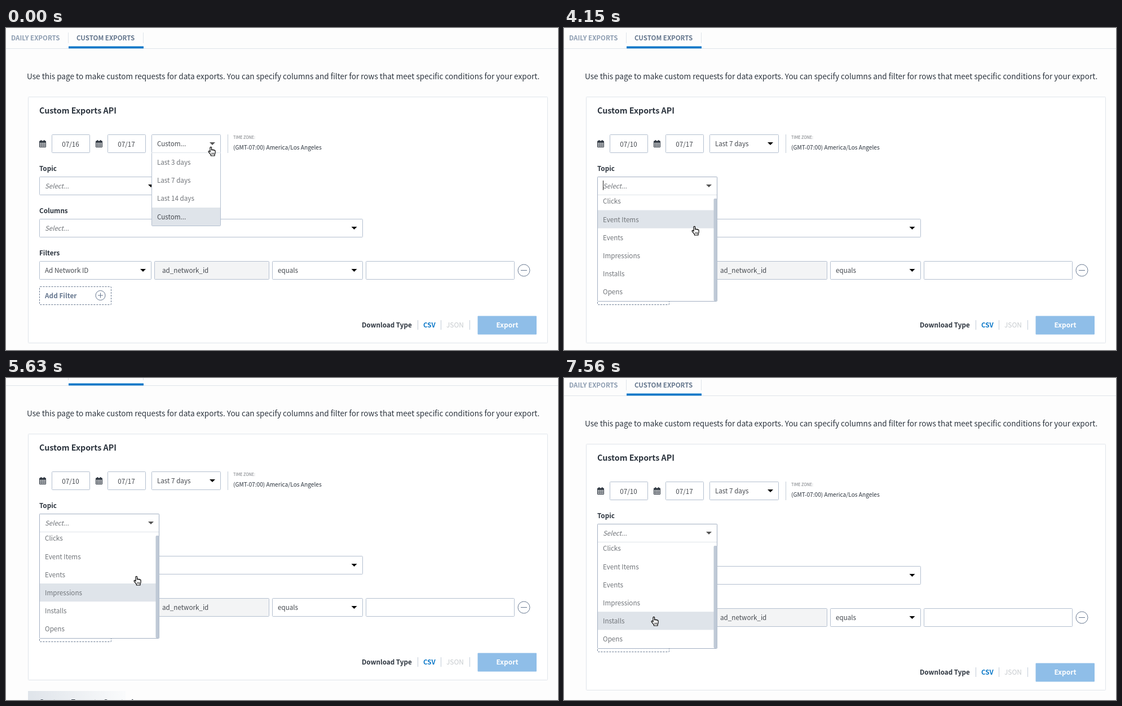
Write an HTML page that moves like this. It is 979 px wide and 572 px high and loops after 8 s.

```html
<!DOCTYPE html>
<html lang="en">
<head>
<meta charset="utf-8">
<title>Custom exports</title>
<style>
  html, body { margin: 0; width: 100%; height: 100%; overflow: hidden; background: #fdfdfd; }
  svg { display: block; width: 100vw; height: 100vh; }
  text { font-family: "Noto Sans CJK JP", "Noto Sans CJK SC", "Noto Sans CJK KR", "Noto Sans", sans-serif; white-space: pre; }
</style>
</head>
<body>
<svg id="stage" viewBox="0 0 979 572"></svg>
<script>
const LOOP = 8000, TICK = 148.1;
const INK = '#2c343e', BODY = '#45494f', SOFT = '#707479', SLATE = '#66778f';
const EDGE = '#b3bfcf', RULE = '#dfe4ea', FILL = '#dfe4ea', BLUE = '#0b78c8';
const ROW = 32.2, FIELD = 11.65;

// Markup helpers
const text = (x, y, str, size, weight = 400, fill = INK, more = '') =>
  `<text x="${x}" y="${y}" font-size="${size}" font-weight="${weight}" fill="${fill}" ${more}>${str}</text>`;
const rect = (x, y, w, h, fill, more = '') =>
  `<rect x="${x}" y="${y}" width="${w}" height="${h}" fill="${fill}" ${more}/>`;
const box = (x, y, w, h = 33, fill = '#fff', stroke = EDGE, more = '') =>
  rect(x + .5, y + .5, w - 1, h - 1, fill, `stroke="${stroke}" rx="1" ${more}`);
const vline = (x, y, h, color = '#c3ccd8') => rect(x, y, 1, h, color);
const arrow = (x, y, fill = '#000', w = 5, more = '') =>
  `<path d="M${x - w} ${y}h${2 * w}l${-w} ${w}z" fill="${fill}" ${more}/>`;
const label = (y, str) => text(59, y, str, 11.7, 600);
const field = (x, y, str, more = '') => text(x, y, str, FIELD, 300, BODY, more);
const hint = (y, more = '') => text(69, y, 'Select...', 11.5, 300, SOFT, `font-style="italic" ${more}`);
const group = (id, body) => `<g id="${id}">${body}</g>`;
const ring = (x, y, r, arm, plus) =>
  `<g fill="none" stroke="${SLATE}"><circle cx="${x}" cy="${y}" r="${r}"/>` +
  `<path d="M${x - arm} ${y}h${2 * arm}${plus ? `M${x} ${y - arm}v${2 * arm}` : ''}"/></g>`;

function calendar(x, y) {
  let cells = '';
  for (let i = 0; i < 12; i++)
    cells += rect(x + 1.2 + (i % 4) * 2.65, y + 4.8 + Math.floor(i / 4) * 2.6, 1.8, 1.8, '#fff');
  return rect(x, y + 1.6, 12, 11.4, INK, 'rx="1"') + cells +
    rect(x + 2.3, y, 2, 3.4, INK, 'rx=".8"') + rect(x + 7.7, y, 2, 3.4, INK, 'rx=".8"');
}

const tabs =
  rect(0, 36, 979, 1, RULE) +
  text(9, 21.5, 'DAILY EXPORTS', 11.5, 600, '#8d9db1') +
  text(125, 21.5, 'CUSTOM EXPORTS', 11.5, 600, '#63758c') +
  vline(110, 8, 19, RULE) + vline(243, 8, 19, RULE) +
  rect(111, 32.5, 133, 3.8, BLUE);

const form =
  text(37, 91, 'Use this page to make custom requests for data exports. You can specify columns and filter for rows that meet specific conditions for your export.', 13.59) +
  box(39, 122, 922, 438, '#fff', RULE) +
  text(59, 152, 'Custom Exports API', 14.3, 700) +
  calendar(59, 199) + calendar(159, 199) +
  box(81, 189, 68) + box(180, 189, 68) +
  field(114.5, 210.5, '', 'id="from" text-anchor="middle"') +
  field(213.5, 210.5, '07/17', 'text-anchor="middle"') +
  vline(393, 189, 33) +
  text(403, 197, 'TIME ZONE:', 7.2, 400, SOFT) +
  text(403, 216, '(GMT-07:00) America/Los Angeles', 10.17) +
  label(254, 'Topic') + box(59, 264, 213) + hint(284.5) +
  arrow(257, 278, '#000', 5, 'id="topicArrow"') +
  label(329, 'Columns') + box(59, 339, 574) + hint(359.5) + arrow(617.5, 353) +
  label(404, 'Filters') +
  box(59, 414, 199) + field(69, 434.5, 'Ad Network ID') + arrow(243, 428) +
  box(263, 414, 204, 33, '#f3f4f5') + field(277, 434.5, 'ad_network_id') +
  box(472, 414, 161) + field(482, 434.5, 'equals') + arrow(617.5, 428) +
  box(638, 414, 264) + ring(918.5, 430.5, 10.5, 5.5) +
  box(59, 459, 128, 33, '#fff', SLATE, 'stroke-dasharray="3 2"') +
  text(69, 480, 'Add Filter', 11.8, 600, SLATE) + ring(167.5, 475, 8.5, 4.5, true) +
  text(631, 532, 'Download Type', 11.65, 600) + vline(730, 519, 17) +
  text(740, 532, 'CSV', 11.65, 700, BLUE) + vline(771, 519, 17) +
  text(781, 532, 'JSON', 11.9, 400, '#c6cace') + vline(822, 519, 17) +
  rect(836.5, 511.5, 104.5, 33, '#8fbee8', 'rx="1"') +
  text(889, 532, 'Export', 12, 600, '#fff', 'text-anchor="middle"');

const heads = [
  [65, 'DATE CREATED', 149.5], [228, 'TOPIC / DATE RANGE', 344.5],
  [591, 'ROW COUNT', 663.5], [700, 'FORMAT', 751.5], [790, 'STATUS', 837.5]
];
const table =
  rect(39, 579, 173, 39, 'url(#fade)') +
  text(58, 605, 'Custom Exports Created', 14.3, 700) +
  box(39, 618, 922, 200, '#fff', RULE) +
  box(47, 608, 907, 60, '#f0f2f6', RULE) +
  [211, 573, 683, 773].map(x => vline(x, 609, 40, '#fff')).join('') +
  heads.map(([x, str, ax], i) => {
    const color = i ? '#5a6b82' : BLUE;
    return text(x, 634.5, str, 10, 700, color, 'letter-spacing=".35"') + arrow(ax, 629, color, 3.5);
  }).join('');

// Range picker
const ranges = ['Last 3 days', 'Last 7 days', 'Last 14 days', 'Custom...'];
const range =
  rect(256.5, 187.5, 126, 36, 'none', 'id="glow" rx="3" stroke="#cfe5f7" stroke-width="3"') +
  box(258, 189, 123, 33, '#fff', EDGE, 'id="rangeBox"') +
  field(268, 210, '', 'id="rangeText"') + arrow(366, 203, '#000', 5, 'id="rangeArrow"') +
  group('rangeMenu',
    box(258, 221, 123, 131, '#fff', EDGE) + rect(259, 221, 121, 1, RULE) +
    rect(259, 319, 121, 32, FILL) + rect(259, 254.5, 121, 32, FILL, 'id="rangeHover"') +
    ranges.map((s, i) => text(268, 243 + i * ROW, s, FIELD, 300, i < 3 ? SOFT : BODY)).join(''));

// Topic picker
const topics = ['Clicks', 'Event Items', 'Events', 'Impressions', 'Installs', 'Opens'];
const topicMenu = group('topicMenu',
  box(59, 264, 213, 222, '#fff', '#a3b0c2') + rect(60, 296, 211, 1, RULE) +
  hint(284.5) + arrow(257, 278, '#555') + rect(69, 271, 1, 17, '#222', 'id="caret"') +
  '<g clip-path="url(#list)">' + rect(60, 0, 206, ROW, FILL, 'id="topicHover"') +
  topics.map((s, i) => text(69, 312.3 + i * ROW, s, FIELD, 300, SOFT)).join('') + '</g>' +
  rect(265.5, 303, 6, 182, '#bfc9d6', 'rx="2"'));

const hand = group('hand',
  '<path d="M3.8 9.6V2a1.3 1.3 0 0 1 2.6 0V6.3a1.2 1.2 0 0 1 2.3.2a1.15 1.15 0 0 1 2.2.5a1.1 1.1 0 0 1 2 .8v3.2c0 1.6-.9 2.3-1.1 3.4v2H5.2v-1.4C4.4 13.4 2.6 11.6 1.1 9.7C.3 8.3 1.8 7.2 2.9 8.3z" fill="#fff" stroke="#000" stroke-width="1.2" stroke-linejoin="round"/>' +
  '<path d="M6.7 11v3.2M8.6 11v3.2M10.4 11v3.2" stroke="#000" stroke-width=".8"/>');

const stage = document.getElementById('stage');
stage.innerHTML =
  `<defs><linearGradient id="fade"><stop stop-color="${FILL}"/><stop offset="1" stop-color="#fafbfc"/></linearGradient>` +
  '<clipPath id="list"><rect x="60" y="297" width="206" height="188"/></clipPath></defs>' +
  rect(0, 0, 979, 572, '#fdfdfd') +
  group('page', tabs + form + table + range + topicMenu) + hand;

const el = {};
stage.querySelectorAll('[id]').forEach(n => el[n.id] = n);
const set = (id, name, value) => el[id].setAttribute(name, value);
const show = (id, on) => set(id, 'visibility', on ? 'visible' : 'hidden');

// Held steps: each row is [tick, ...values]
const pointer = [
  [0, 365, 219], [1, 362, 230], [2, 350, 257], [3, 343, 274],
  [12, 340, 277], [13, 323, 284], [14, 297, 291], [15, 274, 291], [16, 262, 288], [17, 259, 287],
  [24, 257, 296], [25, 247, 337], [26, 237, 396], [27, 233, 374], [28, 233, 360],
  [44, 228, 362], [45, 209, 378], [46, 182, 406], [47, 165, 427], [48, 161, 432]
];
const scroll = [[0, 0], [31, 4], [32, 28], [33, 52], [34, 62], [36, 57], [37, 41], [38, 23], [39, 11], [40, 5]];
const hover = [[0, 0], [25, 1], [26, 3], [27, 2], [28, 1], [35, 3], [44, 2], [46, 3], [47, 4]];
const at = (steps, tick) => steps.filter(s => s[0] <= tick).pop();

function draw(t) {
  const tick = Math.floor(t / TICK);
  const picking = tick < 8, open = tick >= 21, focused = !picking && !open;
  const [, x, y] = at(pointer, tick);

  set('page', 'transform', `translate(0 ${-at(scroll, tick)[1]})`);
  set('hand', 'transform', `translate(${x - 6.8} ${y - 8.4})`);

  el.from.textContent = tick < 12 ? '07/16' : '07/10';
  el.rangeText.textContent = picking ? 'Custom...' : 'Last 7 days';
  set('rangeArrow', 'fill', picking ? '#555' : '#000');
  set('rangeBox', 'stroke', focused ? '#1c86d6' : EDGE);
  set('glow', 'opacity', focused ? (tick === 8 ? .5 : 1) : tick === 21 ? .4 : 0);
  show('rangeMenu', picking);
  show('rangeHover', picking && tick >= 3);

  set('topicArrow', 'fill', tick >= 16 ? '#666' : '#000');
  show('topicMenu', open);
  show('caret', open && Math.floor((tick * TICK - 3020) / 500) % 2 === 0);
  set('topicHover', 'y', 291.4 + at(hover, tick)[1] * ROW);
}

function loop(now) {
  draw(now % LOOP);
  requestAnimationFrame(loop);
}
draw(0);
requestAnimationFrame(loop);
</script>
</body>
</html>
```
